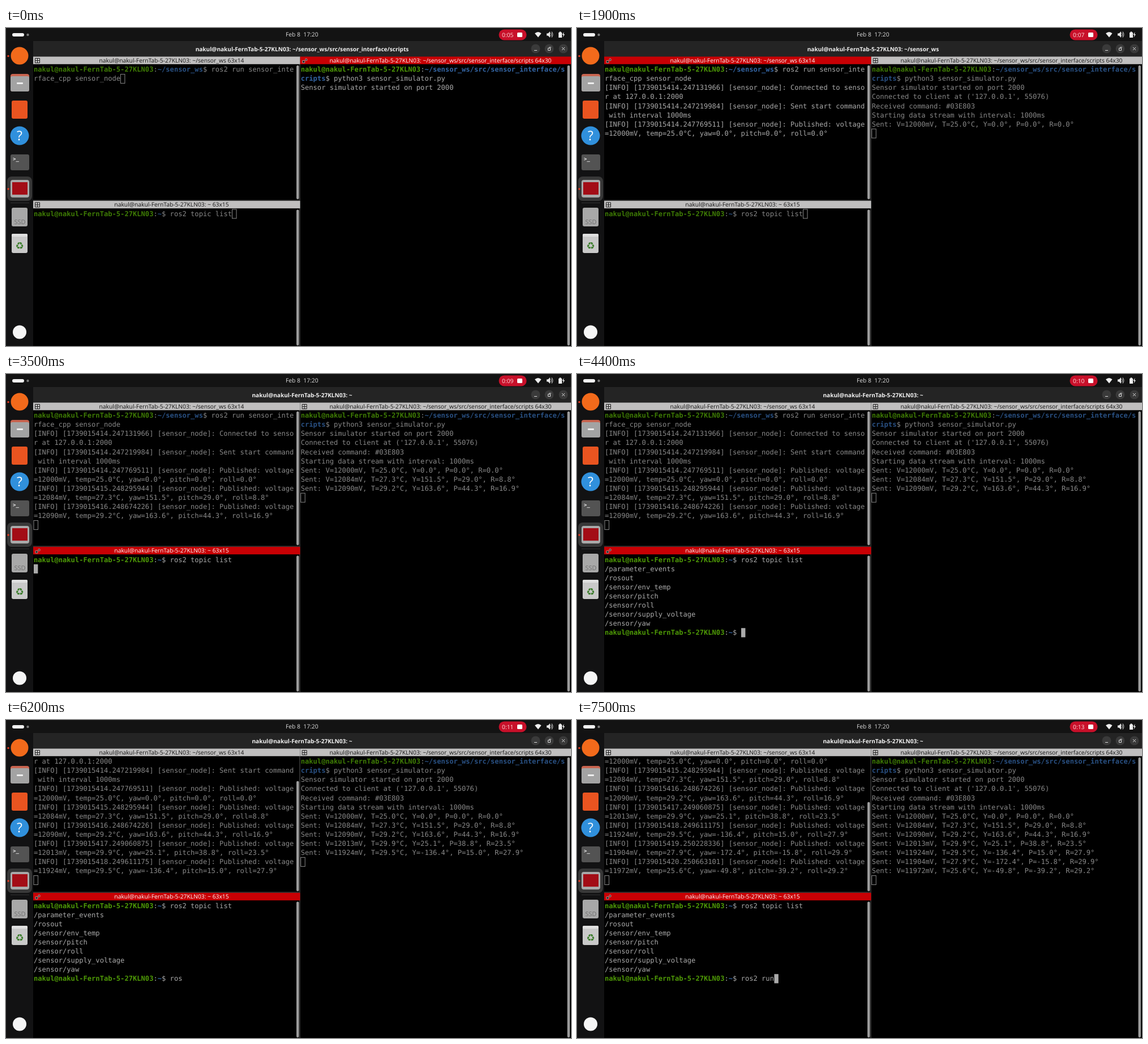
An HTML page for the animation above (8000 ms loop, 998 by 561 pixels).

```html
<!DOCTYPE html>
<html lang="en">
<head>
<meta charset="utf-8">
<title>Terminal session</title>
<style>
  html, body { margin: 0; height: 100%; overflow: hidden; background: #000; }
  svg { display: block; width: 100vw; height: 100vh; }
  text { font: 10.3px "Open Sans", sans-serif; text-rendering: geometricPrecision; }
  .mid { text-anchor: middle; }
  .term text { font: 12.125px "DejaVu Sans Mono", monospace; fill: #aaa; white-space: pre; }
  .term.idle { opacity: .8; }
  .term .user { fill: #4e9a06; font-weight: bold; }
  .term .path { fill: #3465a4; font-weight: bold; }
</style>
</head>
<body>
<svg viewBox="0 0 998 561" xmlns="http://www.w3.org/2000/svg">
  <rect width="998" height="561"/>
  <rect width="998" height="23" fill="#131313"/>
  <rect y="23" width="48" height="538" fill="#121213"/>
  <rect x="48" y="23" width="950" height="28" fill="#242424"/>

  <!-- top bar -->
  <rect x="11" y="9" width="21" height="6" rx="3" fill="#f2f2f2"/>
  <circle cx="38.500" cy="12" r="2.200" fill="#777"/>
  <text x="494" y="15" fill="#dedede" xml:space="preserve">Feb 8  17:20</text>
  <rect x="870.500" y="2.500" width="49" height="19" rx="9.500" fill="#c8102a"/>
  <rect x="903" y="8" width="9" height="8" rx="1.500" fill="#fff"/>
  <g fill="#eee">
    <path d="M934 9.500Q940 4.500 945.500 9.500L940 16.500Z"/>
    <path d="M955 9.500h2.500l3.500-3.500v11l-3.500-3.500H955z"/>
    <path d="M962.500 8.500q2 3 0 6M964 6.500q3.500 5 0 10" fill="none" stroke="#eee"/>
    <path d="M976 8h1.500v-1.500h3V8h1.500v9h-6z"/>
    <path d="M985.500 7l-3 5h2l-1 4.500 3.500-5.500h-2z"/>
  </g>

  <!-- window buttons -->
  <g fill="#3a3a3a">
    <circle cx="935.500" cy="36.500" r="8"/><circle cx="959.500" cy="36.500" r="8"/><circle cx="984.500" cy="36.500" r="8"/>
  </g>
  <path d="M933 39.500h5M957.500 35.500h4v4h-4zM959 34h4M982 34l5 5m0-5l-5 5" fill="none" stroke="#ddd"/>

  <!-- dock -->
  <circle cx="24" cy="49" r="15.500" fill="#f26a1b"/>
  <rect x="8" y="81" width="33" height="31" rx="4" fill="#c8644f"/>
  <rect x="8" y="85" width="33" height="27" rx="3" fill="#a3a3a3"/>
  <rect x="19" y="96" width="11" height="3" rx="1" fill="#eee"/>
  <rect x="10" y="128" width="28" height="32" rx="3" fill="#e95420"/>
  <circle cx="24" cy="190" r="16.500" fill="#3090dc"/>
  <text x="24" y="198" class="mid" style="font-size:23px" fill="#fff">?</text>
  <rect x="8" y="223" width="33" height="28" rx="3" fill="#535353"/>
  <text x="12" y="234" style="font:bold 9px 'DejaVu Sans Mono',monospace" fill="#eee">&gt;_</text>
  <rect x="2" y="262" width="44" height="43" rx="8" fill="#383838"/>
  <rect x="8" y="268" width="33" height="31" rx="4" fill="#a9a9a9"/>
  <rect x="11" y="272" width="27" height="22" fill="#a30d16"/>
  <path d="M8 308.500h33" stroke="#333"/>
  <rect x="10" y="317" width="28" height="33" rx="3" fill="#a8a8a8"/>
  <text x="24.500" y="345.500" class="mid" style="font-size:11px" fill="#707070">SSD</text>
  <rect x="10" y="363" width="28" height="34" rx="3" fill="#c9c9c9"/>
  <rect x="10" y="363" width="28" height="5" rx="2" fill="#e0e0e0"/>
  <text x="24" y="390" class="mid" style="font:17px 'DejaVu Sans',sans-serif" fill="#3b7d2b">♻</text>
  <circle cx="24" cy="536.500" r="12" fill="#f5f5f5"/>
  <circle cx="4" cy="49.500" r="1.800" fill="#e2391f"/>
  <circle cx="4" cy="284" r="1.800" fill="#e2391f"/>

  <path d="M48 304h472M519 51v510" stroke="#2c2c2c" stroke-width="2"/>
  <g id="live"></g>
</svg>
<script>
const LOOP = 8000, COL = 7.303, ROW = 16.08;
const USER = 'nakul@nakul-FernTab-5-27KLN03';
const WS = '~/sensor_ws', SCRIPTS = WS + '/src/sensor_interface/scripts';

// nanoseconds, mV, temperature, yaw, pitch, roll
const samples = [
  [247769511, 12000, 25, 0, 0, 0],
  [248295944, 12084, 27.3, 151.5, 29, 8.8],
  [248674226, 12090, 29.2, 163.6, 44.3, 16.9],
  [249060875, 12013, 29.9, 25.1, 38.8, 23.5],
  [249611175, 11924, 29.5, -136.4, 15, 27.9],
  [250228336, 11904, 27.9, -172.4, -15.8, 29.9],
  [250663101, 11972, 25.6, -49.8, -39.2, 29.2]
];
const topics = ['/parameter_events', '/rosout',
  ...['env_temp', 'pitch', 'roll', 'supply_voltage', 'yaw'].map(n => '/sensor/' + n)];
const typing = [[5400, 'r'], [5500, 'ro'], [5600, 'ros'], [6500, 'ros2'],
  [7000, 'ros2 r'], [7100, 'ros2 ru'], [7400, 'ros2 run']];
// moments that restart the cursor blink: focus, Enter and key presses
const wakes = [-900, 600, 1300, 2300, 3100, ...typing.map(k => k[0])];

const panes = [
  { x: 48, y: 50.5, w: 471.5, lines: 14, bottom: 302, path: WS, size: '63x14', mid: 292.5 },
  { x: 519.7, y: 50.5, w: 478.3, lines: 30, bottom: 560, path: SCRIPTS, size: '64x30', mid: 767.5 },
  { x: 48, y: 304.9, w: 471.5, lines: 15, bottom: 560, path: '~', size: '63x15', mid: 292.5 }
];

const span = (cls, s) => `<tspan class="${cls}">${s}</tspan>`;
const prompt = (path, cmd) => span('user', USER) + ':' + span('path', path) + cmd;
const log = (sec, ns, msg) =>
  `[INFO] [${1739015414 + sec}.${ns}] [sensor_node]: ${msg}`.match(/.{1,63}/g);

// Each pane yields its rows and the column of the cursor in the row `at`.
function nodePane(t, sent) {
  const rows = [prompt(WS, '$ ros2 run sensor_inte'), 'rface_cpp sensor_node'];
  if (t < 1300) return { rows, at: 1, col: 21 };
  if (sent.length) rows.push(
    ...log(0, 247131966, 'Connected to sensor at 127.0.0.1:2000'),
    ...log(0, 247219984, 'Sent start command with interval 1000ms'));
  sent.forEach(([ns, mv, ...v], i) => {
    const [c, y, p, r] = v.map(n => n.toFixed(1));
    rows.push(...log(i, ns,
      `Published: voltage=${mv}mV, temp=${c}°C, yaw=${y}°, pitch=${p}°, roll=${r}°`));
  });
  return { rows, at: rows.length, col: 0 };
}

function simPane(t, sent) {
  const rows = [prompt(SCRIPTS.slice(0, -6), ''),
    span('path', 'cripts') + '$ python3 sensor_simulator.py',
    'Sensor simulator started on port 2000'];
  if (sent.length) rows.push("Connected to client at ('127.0.0.1', 55076)",
    'Received command: #03E803', 'Starting data stream with interval: 1000ms');
  for (const [, mv, ...v] of sent) {
    const [c, y, p, r] = v.map(n => n.toFixed(1));
    rows.push(`Sent: V=${mv}mV, T=${c}°C, Y=${y}°, P=${p}°, R=${r}°`);
  }
  return { rows, at: rows.length, col: 0 };
}

function topicPane(t) {
  const rows = [prompt('~', '$ ros2 topic list')];
  if (t < 3100) return { rows, at: 0, col: 48 };
  if (t >= 4000) rows.push(...topics);
  if (t < 4200) return { rows, at: rows.length, col: 0 };
  const cmd = typing.filter(k => k[0] <= t).pop()?.[1] ?? '';
  rows.push(prompt('~', '$ ' + cmd));
  return { rows, at: 8, col: 33 + cmd.length };
}

function drawPane(p, { rows, at, col }, active, blinkOn) {
  const top = p.y + 14.5, count = Math.max(rows.length, at + 1);
  const skip = Math.max(0, count - p.lines);
  const tall = p.bottom - top - 1;
  const barH = tall * Math.min(1, p.lines / count);
  const ink = active ? '#fff' : '#151515', iy = p.y + 3;
  const icon = active
    ? `<path d="M${p.x + 4} ${iy + 4}h4v4h-4zM${p.x + 9} ${iy + 1}h3v3h-3z" fill="#222" stroke="#ddd" stroke-width=".6"/>`
    : `<path d="M${p.x + 3.5} ${iy}h8v8h-8zm4 0v8m-4-4h8" fill="none" stroke="#222"/>`;
  const text = rows.slice(skip).map((r, i) =>
    `<text x="${p.x + 1}" y="${(top + 12.2 + i * ROW).toFixed(2)}" xml:space="preserve">${r}</text>`).join('');
  const cx = p.x + 1 + col * COL, cy = top + (at - skip) * ROW;
  const cursor = !active
    ? `<rect x="${cx.toFixed(1)}" y="${cy + .5}" width="7.500" height="16" fill="none" stroke="#aaa"/>`
    : blinkOn ? `<rect x="${cx.toFixed(1)}" y="${cy + .2}" width="7.400" height="16.200" fill="#aaa"/>` : '';
  return `<rect x="${p.x}" y="${p.y}" width="${p.w}" height="13.300" fill="${active ? '#c80004' : '#c0bfbf'}"/>
    ${icon}<text x="${p.mid}" y="${p.y + 10.5}" class="mid" fill="${ink}">${USER}: ${p.path} ${p.size}</text>
    <rect x="${p.x + p.w - 6.5}" y="${p.bottom - barH}" width="4.500" height="${barH}" rx="2" fill="#9c9c9c"/>
    <g class="term${active ? '' : ' idle'}">${text}${cursor}</g>`;
}

const live = document.getElementById('live');
let shown = '';

function frame(now) {
  const t = now % LOOP;
  const focus = t < 600 ? 1 : t < 2300 ? 0 : 2;
  const sent = samples.slice(0, Math.max(0, Math.floor((t - 500) / 1000)));
  const wake = wakes.filter(w => w <= t).pop();
  const blinkOn = Math.floor((t - wake) / 600) % 2 === 0;
  const sec = 6 + Math.floor((t - 300) / 1013);
  const states = [nodePane(t, sent), simPane(t, sent), topicPane(t)];
  const html = `<text x="876" y="15.500" fill="#ffdcdc">0:${String(sec).padStart(2, '0')}</text>
    <text x="523" y="40.500" class="mid" style="font-size:10.1px;font-weight:700" fill="#f2f2f2">${USER}: ${panes[focus].path}</text>`
    + panes.map((p, i) => drawPane(p, states[i], i === focus, blinkOn)).join('');
  if (html !== shown) live.innerHTML = shown = html;
  requestAnimationFrame(frame);
}
frame(performance.now());
</script>
</body>
</html>
```
